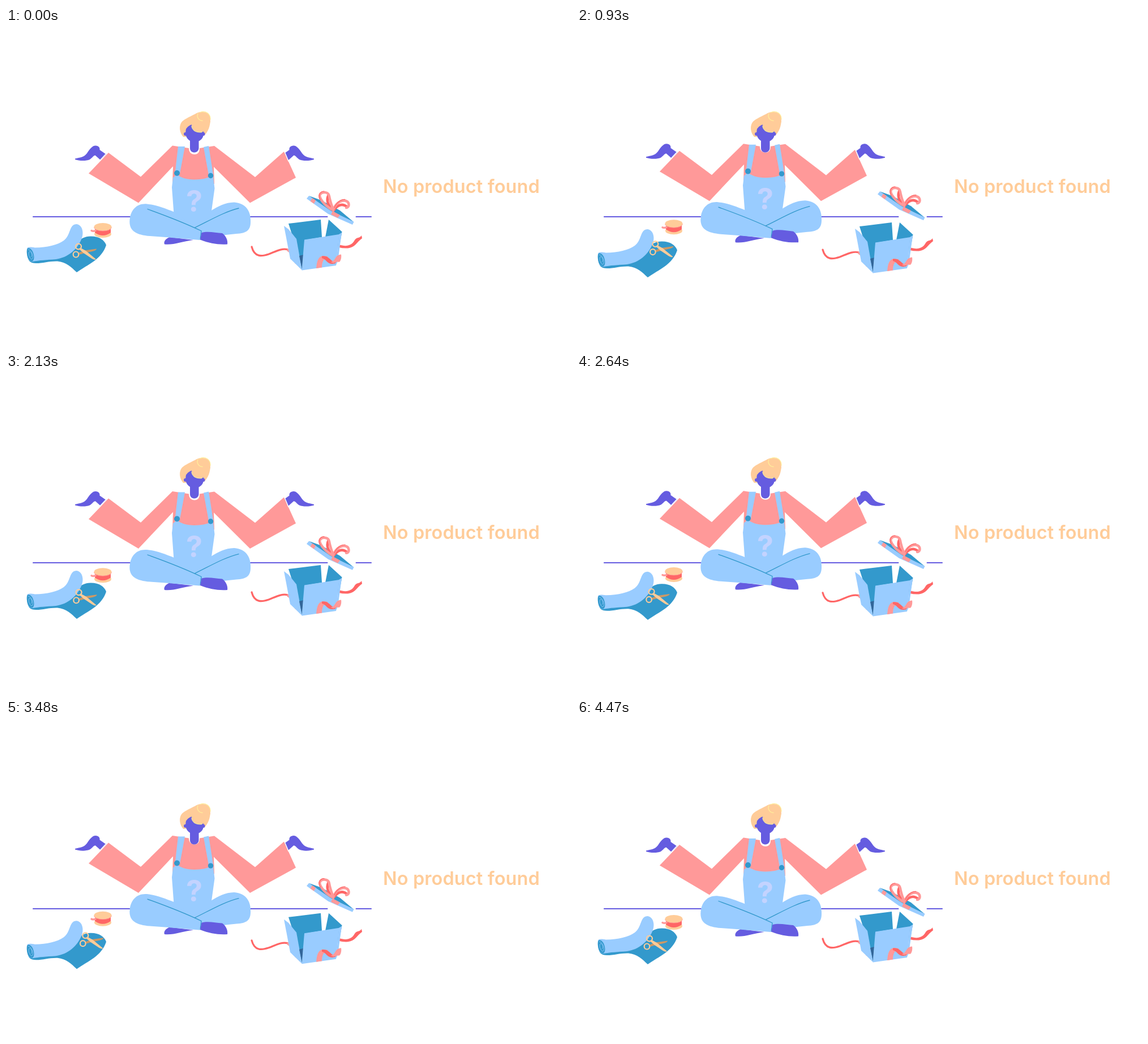
An HTML page for the animation above (4500 ms loop, 998 px wide and 561 px high).

```html
<!DOCTYPE html>
<html lang="en">
<head>
<meta charset="utf-8">
<title>No product found</title>
<style>
  html, body { margin: 0; width: 100%; height: 100%; overflow: hidden; background: #fff; }
  svg { display: block; width: 100vw; height: 100vh; }
  text { font-family: Inter, sans-serif; }
  .skin { fill: #655ce0; }
  .sky { fill: #99ccff; }
  .teal { fill: #3399cc; }
  .pink { fill: #ff9999; }
  .red { fill: #ff6666; }
  .peach { fill: #ffcc99; }
  .line { fill: none; stroke-linecap: round; }
</style>
</head>
<body>
<svg viewBox="0 0 998 561">
  <defs>
    <path id="hand" d="M122 230.5C131 228 137 229 143 221C149 212 153 207.5 158 207.5C164 208 166 211 165.5 215L177 223L167 233L158 225C155 224 153 229 148 232C140 235.5 128 234 122 232Z"/>
  </defs>

  <path class="line" stroke="#655ce0" stroke-width="2" d="M48 333H567.5M618.5 333H645"/>

  <g id="cloth">
    <path class="teal" d="M38 402C39 411 43 415 53 415C66 415 77 411 91 411.5C107 413 115 422 125 431C145 417 169 408 177 383C174 374 164 367 149 367.5C139 368 132 371 129 377L90 400Z"/>
    <path class="sky" d="M37 390C37 386 42 386 51 387.5C73 387 91 383 102 375C115 365 111 347 124 346C136 347 138 363 133 373C126 390 110 405 88 408C71 409 58 410 47 412C38 412 36 399 37 390Z"/>
    <path class="teal" d="M37 391C38 386 44 388 47 394C51 403 50 412 45 411.5C38 410 36 399 37 391Z"/>
    <path class="line" stroke="#99ccff" stroke-width=".8" d="M39 391C45 390 50 404 46 408C41 408 38 396 42 394C46 396 47 403 44 404"/>
  </g>

  <g id="scissors">
    <path fill="#cc9966" d="M127 397L138 392.500L160 389.500Q160 392 153 394L139 397L129 400Z"/>
    <path class="peach" d="M131 387.500L141 393L159 408Q157 410 152 407L137 397L129 390Z"/>
    <g class="line" stroke="#ffcc99" stroke-width="2.2">
      <ellipse cx="128" cy="385.5" rx="5" ry="4.8"/>
      <ellipse cx="123.5" cy="399.5" rx="4.8" ry="5"/>
    </g>
  </g>

  <g id="spool">
    <ellipse class="peach" cx="171" cy="363.5" rx="15" ry="6.5"/>
    <path class="red" d="M157 355V361Q171 371 185 361V353Z"/>
    <path class="line" stroke="#ff9999" stroke-width="3.4" d="M151 357.5Q154 359 158 357.5"/>
    <ellipse class="peach" cx="171" cy="351" rx="15.5" ry="7"/>
    <path class="line" stroke="#ff9999" stroke-width=".8" d="M155.500 352Q157 358 171 358T186.500 352"/>
  </g>

  <g id="body">
    <use href="#hand" class="skin"/>
    <use href="#hand" class="skin" transform="matrix(-1 0 0 1 666 0)"/>
    <path class="pink" d="M181 220L238 262.500L294 207.500L323 212C323 219 327 223 333 223S342 219 342 212L368 208L440 263L491 218L512 264L431 308.500L367 245L368 275H294L295 244L234 308.500L146 256.500Z"/>
    <path class="line" stroke="#fff" stroke-width="1.5" d="M180 218.500L165 234.500M491 216L499 235"/>
    <path class="skin" d="M289 369C281 372 278 378 280 381.500C296 383 310 377 331 374Z"/>
    <path class="sky" d="M295 264L302 258Q311 267 333 267.500Q352 267 361 262L366 262L368.500 283L362 330L332 357L297 335L293 281Z"/>
    <path class="sky" d="M304 209L316 209L307 257H298.500ZM349 210L358 208L366.500 262H358.500Z"/>
    <circle class="teal" cx="302" cy="256" r="5"/>
    <circle class="teal" cx="361.500" cy="260.500" r="4.700"/>
    <text x="332.500" y="323.500" font-size="52" font-weight="700" text-anchor="middle" fill="#c3d3ff">?</text>
    <path class="sky" d="M331 352L361 323C376 314 387 308 403 307.500C424 309 433 324 432 342C432 357 425 362 407 363C385 365 362 368 340 371Z"/>
    <path class="sky" d="M218.500 339C220 320 232 309 249 310.500C266 312 280 318 298 325L345 358L342 374C309 371 282 369 254 367C229 365 217 357 218.500 339Z"/>
    <path class="line" stroke="#3399cc" stroke-width="1.300" d="M250 319.500C282 331 314 343 345 358L343 373M333 352.500C359 340 386 324 411 318"/>
    <path class="skin" d="M345.500 361C356 358 370 361 382 362C389 367 392 375 391 381.500C374 382.500 360 380 343 373.500Z"/>
  </g>

  <g id="head">
    <path class="peach" d="M313 192C306 184 305 172 311 165C316 160 328 155 337 150C345 146 360 147 361 159C361 174 357 183 350 190Z"/>
    <path class="skin" d="M318 178C323 171 329 169 334 171L349 182C350 192 346 197 340.500 199.500V212C340 222 325 222 325 212V199C318 195 316 187 318 178Z"/>
    <circle class="skin" cx="317" cy="187" r="3"/>
    <circle class="skin" cx="348.500" cy="187" r="3"/>
    <path class="peach" d="M328 170C328 179 335 184 344 183.500C354 183 359 174 361 164L345 157Z"/>
    <path class="line" stroke="#ffee99" stroke-width="1.300" d="M328 173C329 181 337 185 346 183.500M339 151C336 157 341 164 347 163.500M342 149C353 145 361 151 361 161"/>
  </g>

  <g id="box">
    <path class="line" stroke="#ff6666" stroke-width="3.200" stroke-linecap="butt" d="M434 386C439 405 452 403 464 399C477 394 487 388 498 391"/>
    <path class="line" stroke="#ff9999" stroke-width="4" d="M498 392C507 397 510 406 512 414"/>
    <path class="red" d="M588 382C600 386 610 385 616 374C619 369 625 371 628 366L629 371C620 377 617 387 604 388.500Q595 389 588 387Z"/>
    <path class="teal" d="M499 345L556 338L558 369L528 374L523 426L507 370ZM570 338L593.500 359.500L588 389L564 369Z"/>
    <path class="sky" d="M588 364L593 361L586 412L583 418Z"/>
    <path class="sky" d="M491 349L499 355L513 372L523 427.500L502 407Z"/>
    <path fill="#336699" d="M518 402L525 400L523 426Z"/>
    <path class="sky" d="M527 373.500L588.500 364L583 419L522.500 427.500Z"/>
    <path class="pink" d="M548 424C549 412 551 404 559 402L569 403C560 407 558 414 558 422.500Z"/>
    <path class="red" d="M558 402.500C573 400 574 417 584 411L582 415C568 420 566 407 558 406Z"/>
    <path class="pink" d="M574 413C584 410 579 401 592 399.500C593 406 591 412 588 413C583 411 580 417 574 413Z"/>
  </g>

  <g id="lid">
    <path class="teal" d="M535 296L557 304L590 322L614.500 342.500L573 324Z"/>
    <path class="sky" d="M535 296L573 322L614.500 342L612 347L569 328L531 301Z"/>
    <path class="pink" d="M541 300L547 304L544 310L537.500 305.500ZM577 323L590 330L586 335L574 329Z"/>
    <path class="line" stroke="#ff6666" stroke-width="4.500" d="M569 296C565 306 570 314 577 321M579 321C586 312 594 309 602 315"/>
    <path class="line" stroke="#ff9999" stroke-width="4.500" d="M575 320C563 313 551 299 555 293C559 288 570 289 571 297C572 304 575 312 578 321C581 312 589 304 598 304.500C608 306 607 317 601 317"/>
    <path class="line" stroke="#ff6666" stroke-width="1.200" d="M555 303C551 296 554 288 562 288M580 317C584 308 591 302 599 302.500"/>
  </g>

  <text x="666" y="291" font-size="32.4" font-weight="600" letter-spacing=".15" fill="#ffcc99">No product found</text>
</svg>
<script>
  const LOOP = 4500, HALF = 1125;

  // Direction of travel, then offsets at each quarter of the loop
  const floats = {
    cloth: [0, 1, [0, 9.7, 0.8, 8.4, 0]],
    scissors: [1, -0.43, [0, 11.2, 0.3, 12.6, 0]],
    spool: [0, -1, [0, 6.3, 1.7, 6.5, 0]],
    body: [0, -1, [0, 3.6, 0.4, 3.5, 0]],
    box: [0, 1, [0, 5.4, -1.2, 2.9, 0]],
    lid: [0, -1, [0, 8.4, 1, 8.5, 0]]
  };

  function offsetAt(keys, t) {
    const i = Math.floor(t / HALF);
    const ease = (1 - Math.cos(Math.PI * (t / HALF - i))) / 2;
    return keys[i] + (keys[i + 1] - keys[i]) * ease;
  }

  function draw() {
    const t = performance.now() % LOOP;
    for (const [id, [dx, dy, keys]] of Object.entries(floats)) {
      const d = offsetAt(keys, t);
      document.getElementById(id).setAttribute("transform", `translate(${dx * d} ${dy * d})`);
    }
    requestAnimationFrame(draw);
  }
  draw();
</script>
</body>
</html>
```
